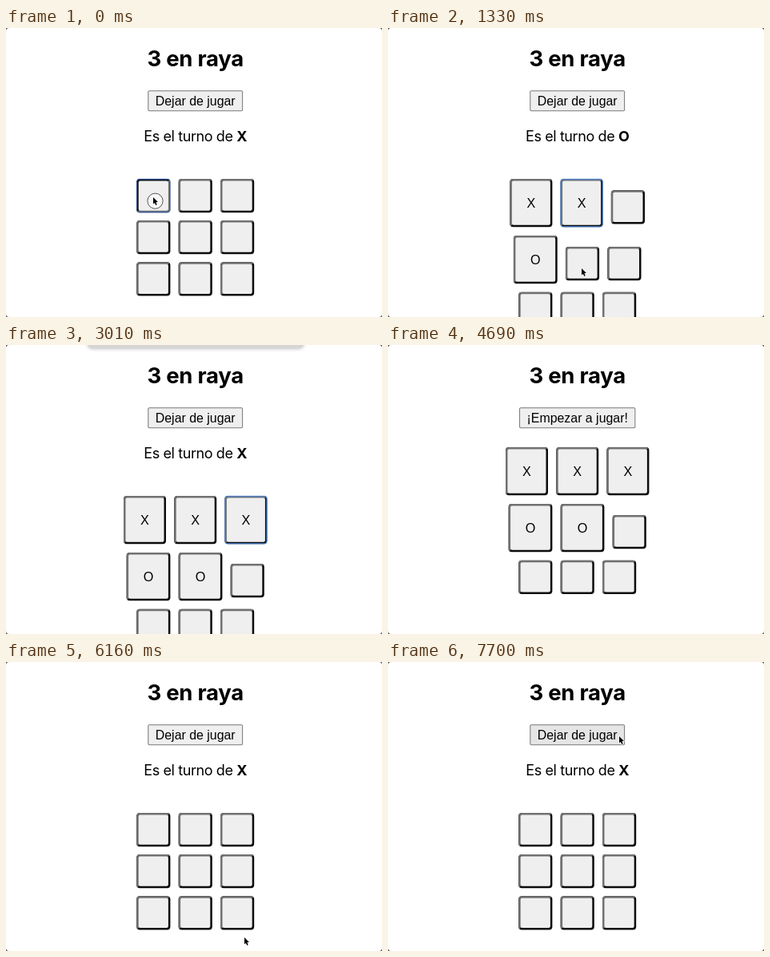
An HTML page with a canvas that plays this animation: 470x362 px, repeating every 8.05 s.

```html
<!DOCTYPE html>
<html lang="es">
<head>
<meta charset="utf-8">
<title>3 en raya</title>
<style>
  html, body { margin: 0; width: 100%; height: 100%; overflow: hidden; background: #fff; }
  canvas { display: block; }
</style>
</head>
<body>
<canvas id="stage" width="470" height="362"></canvas>
<script>
const ctx = document.getElementById('stage').getContext('2d');
const WIDTH = 470, HEIGHT = 362, LOOP = 8050;
const CENTER = 236.7, GAP = 10.2, BORDER = 2.5;
const EMPTY_SIZE = 42.2, FILLED_HEIGHT = 60.3;
const FILLED_WIDTH = { X: 53, O: 54.8 };
const FACE = '#efefef', HOVER_FACE = '#e5e5e5';
const UI = 'Inter, sans-serif', CONTROL = '"Liberation Sans", Arial, sans-serif';

// Cells in the order they are played; X starts.
const MOVES = [0, 3, 1, 4, 2];

// Each step holds until the next one: start time, moves played, options.
const STEPS = [
  [0, 0, { at: [184, 212], press: 0 }],
  [140, 1, { at: [184, 213] }],
  [280, 1, { at: [183, 240] }],
  [490, 1, { at: [182, 280] }],
  [630, 1, { at: [182, 282], press: 3 }],
  [770, 2, { at: [186, 279] }],
  [910, 2, { at: [234, 224], press: 1 }],
  [1120, 3, { at: [236, 232] }],
  [1330, 3, { at: [242, 301] }],
  [1470, 3, { at: [242, 301], press: 4 }],
  [1610, 4, { at: [256, 286] }],
  [1820, 4, { at: [313, 230], press: 2 }],
  [1960, 5, { at: [314, 230] }],
  [2520, 5, { at: [314, 230], alert: true }],
  [2800, 5, { at: [288, 27], alert: true }],
  [3010, 5, { alert: true }],
  [4690, 5, { mode: 'over' }],
  [4830, 5, { mode: 'over', at: [284, 42] }],
  [5040, 5, { mode: 'over', at: [267, 92], hover: true }],
  [5180, 5, { mode: 'over', at: [267, 93], hover: true, ring: true }],
  [5390, 0, { at: [267, 93], hover: true }],
  [6020, 0, { at: [277, 160] }],
  [6160, 0, { at: [298, 345] }],
  [6370, 0, {}],
  [6720, 0, { mode: 'idle' }],
  [6860, 0, { mode: 'idle', at: [342, 240] }],
  [7000, 0, { mode: 'idle', at: [326, 150] }],
  [7210, 0, { mode: 'idle', at: [292, 96], hover: true }],
  [7350, 0, { mode: 'idle', at: [289, 93], hover: true, ring: true }],
  [7560, 0, { at: [289, 93], hover: true, ring: true }],
  [7700, 0, { at: [289, 93], hover: true }]
];

function fillRound(x, y, w, h, r, color) {
  ctx.fillStyle = color;
  ctx.beginPath();
  ctx.roundRect(x, y, w, h, r);
  ctx.fill();
}

function text(str, x, y, font, spacing = 0) {
  ctx.font = font;
  ctx.letterSpacing = spacing + 'px';
  ctx.fillStyle = '#000';
  ctx.fillText(str, x, y);
  return ctx.measureText(str).width;
}

function centered(str, x, y, font, spacing = 0) {
  ctx.textAlign = 'center';
  text(str, x, y, font, spacing);
  ctx.textAlign = 'left';
}

function drawButton(label, hover) {
  const font = '15.9px ' + CONTROL;
  ctx.font = font;
  ctx.letterSpacing = '0px';
  const w = ctx.measureText(label).width + 19;
  const x = CENTER - w / 2;
  fillRound(x, 78.3, w, 26, 2, '#767676');
  fillRound(x + 1, 79.3, w - 2, 24, 1, hover ? HOVER_FACE : FACE);
  centered(label, CENTER, 96.7, font);
}

function drawTurn(player) {
  const lead = 'Es el turno de ';
  const regular = '18px ' + UI, bold = 'bold 18px ' + UI;
  ctx.letterSpacing = '-0.4px';
  ctx.font = regular;
  const leadWidth = ctx.measureText(lead).width;
  ctx.font = bold;
  const x = CENTER - (leadWidth + ctx.measureText(player).width) / 2;
  text(lead, x, 142, regular, -0.4);
  text(player, x + leadWidth, 142, bold, -0.4);
}

function drawCell(x, y, w, h, mark, focused, pressed) {
  const light = '#717171', dark = '#0c0c0c', b = BORDER;
  fillRound(x, y, w, h, 4, pressed ? light : dark);
  ctx.save();
  ctx.beginPath();
  ctx.moveTo(x, y);
  ctx.lineTo(x + w, y);
  ctx.lineTo(x + w - b, y + b);
  ctx.lineTo(x + b, y + h - b);
  ctx.lineTo(x, y + h);
  ctx.clip();
  fillRound(x, y, w, h, 4, pressed ? dark : light);
  ctx.restore();
  fillRound(x + b, y + b, w - 2 * b, h - 2 * b, 2, FACE);
  if (focused) {
    ctx.strokeStyle = pressed ? 'rgba(40, 85, 170, .7)' : 'rgba(72, 130, 215, .8)';
    ctx.lineWidth = 1.4;
    ctx.beginPath();
    ctx.roundRect(x + 0.5, y + 0.5, w - 1, h - 1, 3.5);
    ctx.stroke();
  }
  if (mark) centered(mark, x + w / 2, y + 35.7, '16.2px ' + CONTROL);
}

function drawBoard(top, played, focus, press) {
  const marks = Array(9).fill('');
  MOVES.slice(0, played).forEach((cell, i) => marks[cell] = 'XO'[i % 2]);
  let y = top;
  for (let row = 0; row < 3; row++) {
    const cells = marks.slice(row * 3, row * 3 + 3);
    const widths = cells.map(m => FILLED_WIDTH[m] || EMPTY_SIZE);
    const filled = cells.some(Boolean);
    let x = CENTER - (widths[0] + widths[1] + widths[2] + 2 * GAP) / 2;
    cells.forEach((mark, col) => {
      const index = row * 3 + col;
      const drop = filled && !mark ? 14.2 : 0;
      drawCell(x, y + drop, widths[col], mark ? FILLED_HEIGHT : EMPTY_SIZE,
        mark, index === focus, index === press);
      x += widths[col] + GAP;
    });
    y += filled ? 70.9 : 52.1;
  }
}

function drawAlert() {
  ctx.save();
  ctx.shadowColor = 'rgba(0, 0, 0, .35)';
  ctx.shadowBlur = 5;
  fillRound(102.5, -20, 269, 24, 5, '#d6d6d6');
  ctx.restore();
}

function drawCursor([x, y], ring) {
  ctx.save();
  ctx.translate(x, y);
  if (ring) {
    ctx.beginPath();
    ctx.arc(2.5, 4.7, 9.6, 0, Math.PI * 2);
    ctx.fillStyle = 'rgba(255, 255, 255, .55)';
    ctx.fill();
    ctx.strokeStyle = '#444';
    ctx.lineWidth = 0.9;
    ctx.stroke();
  }
  const arrow = new Path2D('M0 0V8.6L1.9 6.9L3.3 9.9L4.7 9.2L3.4 6.3L6 6.1Z');
  ctx.strokeStyle = '#fff';
  ctx.lineWidth = 1.4;
  ctx.lineJoin = 'round';
  ctx.stroke(arrow);
  ctx.fillStyle = '#000';
  ctx.fill(arrow);
  ctx.restore();
}

function drawCorners() {
  ctx.fillStyle = '#555';
  ctx.beginPath();
  ctx.rect(0, 0, WIDTH, HEIGHT);
  ctx.roundRect(0, 0, WIDTH, HEIGHT, 4);
  ctx.fill('evenodd');
}

function render(time) {
  const [, played, step] = STEPS.findLast(([start]) => start <= time);
  const { mode = 'play', at, press, hover, ring, alert } = step;
  const playing = mode === 'play';
  ctx.fillStyle = '#fff';
  ctx.fillRect(0, 0, WIDTH, HEIGHT);
  centered('3 en raya', CENTER, 48, 'bold 27.5px ' + UI, -0.25);
  drawButton(playing ? 'Dejar de jugar' : '¡Empezar a jugar!', hover);
  if (playing) drawTurn(played === 5 ? 'X' : 'XO'[played % 2]);
  if (mode !== 'idle') {
    const focus = playing ? press ?? MOVES[played - 1] : undefined;
    drawBoard(playing ? 189 : 128, played, focus, press);
  }
  if (alert) drawAlert();
  if (at) drawCursor(at, ring || press !== undefined);
  drawCorners();
}

const began = performance.now();
function tick() {
  render((performance.now() - began) % LOOP);
  requestAnimationFrame(tick);
}
tick();
</script>
</body>
</html>
```
